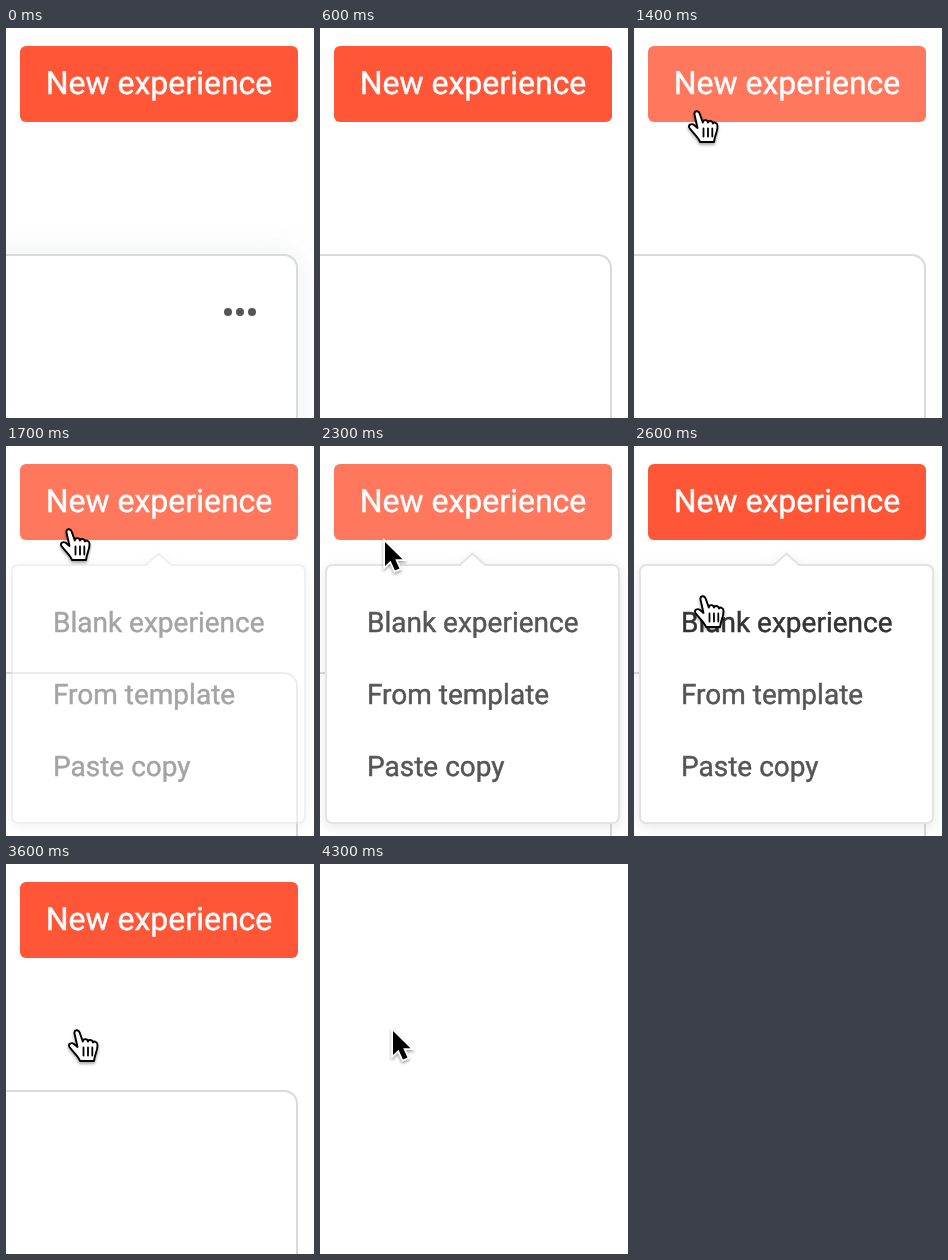
Write an HTML page that moves like this. It is 308 px wide and 390 px high and loops after 4.4 s.

```html
<!DOCTYPE html>
<html lang="en">
<head>
<meta charset="utf-8">
<title>New experience menu</title>
<style>
  html, body { margin: 0; width: 100%; height: 100%; overflow: hidden; background: #fff; }
  svg { display: block; width: 308px; height: 390px; }
  text { font-family: Roboto, sans-serif; text-rendering: geometricPrecision; stroke-width: .45; }
  #card-shadow { filter: drop-shadow(0 0 16px rgba(50, 70, 70, .1)); }
  #panel { filter: drop-shadow(0 3px 6px rgba(0, 0, 0, .09)); }
  #cursor { filter: drop-shadow(0 2px 1.5px rgba(0, 0, 0, .35)); }
</style>
</head>
<body>
<svg viewBox="0 0 308 390">
  <g id="page">
    <rect id="card-shadow" x="-40" y="227" width="331" height="220" rx="13" fill="#fff"/>
    <rect x="-40" y="227" width="331" height="220" rx="13" fill="#fff" stroke="#d9dadc" stroke-width="2"/>
    <g id="dots" fill="#555">
      <circle cx="222" cy="284" r="4"/>
      <circle cx="234" cy="284" r="4"/>
      <circle cx="246" cy="284" r="4"/>
    </g>
    <rect id="button" x="14" y="18" width="278" height="76" rx="6"/>
    <text x="153" y="66" font-size="32" text-anchor="middle" fill="#fff" stroke="#fff">New experience</text>
  </g>
  <g id="menu">
    <path id="panel" fill="#fff" stroke="#e2e3e5" stroke-width="2"
      d="M13 119H140L152.500 107.500L165 119H292Q299 119 299 126V370Q299 377 292 377H13Q6 377 6 370V126Q6 119 13 119Z"/>
    <g font-size="28" fill="#555" stroke="#555">
      <text id="blank" x="47" y="186">Blank experience</text>
      <text x="47" y="258">From template</text>
      <text x="47" y="330">Paste copy</text>
    </g>
  </g>
  <g id="cursor">
    <path id="arrow" transform="translate(1 1)" d="M0 0V24L5.500 18.800L10 28.500L14.500 26.500L10.200 17.200H17.500Z"
      stroke="#fff" stroke-width="3.500" paint-order="stroke"/>
    <g id="hand" transform="translate(-10 -1.500)" stroke="#000" stroke-width="1.900" stroke-linecap="round" stroke-linejoin="round">
      <path fill="#fff" d="M6.500 5C5.800 1.500 10.300 .3 11.600 4L14.800 13C15 10 19.500 9.800 20 13
        C20.800 10.800 24.500 11 25 14C26 12.300 29.500 13 29.500 16.500C29.700 22 27 25 26 32.500
        H12C11 28.500 5 23.500 1.500 18.500C-.5 15.500 3.500 13.500 6 15.500L9.500 18.500Z"/>
      <path fill="none" stroke-width="1.800" d="M15.500 19V27M20 19V27M24.300 19V27"/>
    </g>
  </g>
</svg>
<script>
const LOOP = 4400, STEP = 100;
const $ = id => document.getElementById(id);
const [page, shadow, dots, button, menu, blank, cursor, arrow, hand] =
  ['page', 'card-shadow', 'dots', 'button', 'menu', 'blank', 'cursor', 'arrow', 'hand'].map($);

// time, x, y of the pointer's hot spot
const path = [
  [600, -24, 190], [800, 6, 140], [900, 28, 114], [1000, 46, 95], [1100, 54, 89],
  [1200, 60, 85], [1400, 64, 83], [2100, 64, 83], [2200, 64, 87], [2300, 64, 95],
  [2500, 68, 132], [2600, 70, 150], [2700, 71, 160], [2800, 71.5, 164], [3000, 72, 166]
];

const show = (el, on) => el.setAttribute('visibility', on ? 'visible' : 'hidden');
const ramp = (t, a, b) => Math.min(1, Math.max(0, (t - a) / (b - a)));
const within = (t, a, b) => t >= a && t < b;
const mix = (a, b, k) => `rgb(${a.map((v, i) => Math.round(v + (b[i] - v) * k))})`;

function pointAt(t) {
  const i = path.findIndex(p => p[0] > t);
  if (i < 0) return path[path.length - 1].slice(1);
  if (i === 0) return path[0].slice(1);
  const [t0, x0, y0] = path[i - 1], [t1, x1, y1] = path[i];
  const k = ramp(t, t0, t1);
  return [x0 + (x1 - x0) * k, y0 + (y1 - y0) * k];
}

function draw(t) {
  show(page, t < 4300);
  const cardHover = 1 - ramp(t, 300, 600);
  shadow.setAttribute('opacity', cardHover);
  dots.setAttribute('opacity', cardHover);

  const hover = ramp(t, 1000, 1300) - ramp(t, 2300, 2500);
  button.setAttribute('fill', mix([255, 86, 55], [255, 119, 92], hover));

  show(menu, within(t, 1600, 3600));
  menu.setAttribute('opacity', 1 - (1 - ramp(t, 1500, 2000)) ** 1.5);
  const ink = t >= 2600 ? '#333' : '#555';
  blank.setAttribute('fill', ink);
  blank.setAttribute('stroke', ink);

  const pointing = within(t, 1100, 2300) || within(t, 2600, 4100);
  cursor.setAttribute('transform', `translate(${pointAt(t)})`);
  show(arrow, t >= 600 && !pointing);
  show(hand, pointing);
}

const start = performance.now();
function tick() {
  const t = (performance.now() - start) % LOOP;
  draw(Math.floor(t / STEP) * STEP);
  requestAnimationFrame(tick);
}
tick();
</script>
</body>
</html>
```
